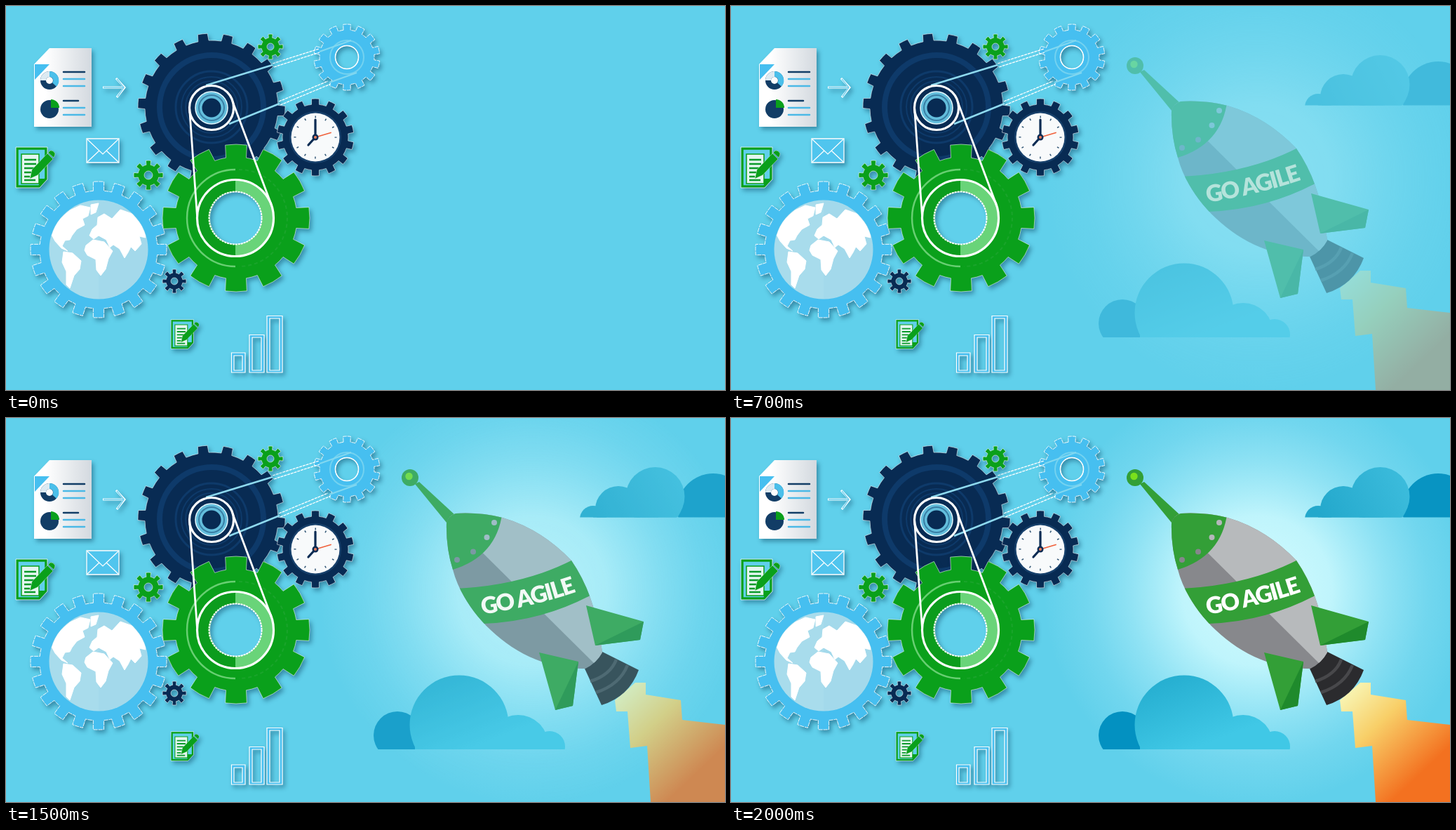
Animation, 1025 px wide and 547 px high, one loop 2.1 s. Source, as an HTML page:

```html
<!DOCTYPE html>
<html lang="en">
<head>
<meta charset="utf-8">
<title>Go agile</title>
<style>
  html, body { margin: 0; width: 100%; height: 100%; overflow: hidden; background: #60d0eb; }
  svg { display: block; width: 1025px; height: 547px; }
  .shadow { filter: drop-shadow(3px 4px 3px rgba(0, 50, 80, .42)); }
  .line { fill: none; stroke: #fff; }
  .navy { fill: #082b53; }
  .green { fill: #0aa01b; }
  .sky { fill: #46bff0; }
  .leaf { fill: #339f37; }
  .leafDark { fill: #1f8a2c; }
  .edge { stroke: #fff; stroke-opacity: .55; fill-rule: evenodd; }
  .sky.edge { stroke-opacity: .9; stroke-dasharray: 6 1; }
</style>
</head>
<body>
<svg viewBox="0 0 1025 547">
  <defs>
    <radialGradient id="glow" gradientUnits="userSpaceOnUse" cx="750" cy="246" r="305">
      <stop offset="0" stop-color="#d4fcff"/>
      <stop offset=".35" stop-color="#d0fbff" stop-opacity=".85"/>
      <stop offset=".6" stop-color="#c8f8ff" stop-opacity=".45"/>
      <stop offset=".8" stop-color="#c0f4ff" stop-opacity=".18"/>
      <stop offset="1" stop-color="#c0f4ff" stop-opacity="0"/>
    </radialGradient>
    <linearGradient id="paper">
      <stop offset=".2" stop-color="#fff"/><stop offset="1" stop-color="#d3d9df"/>
    </linearGradient>
    <linearGradient id="flame" gradientUnits="userSpaceOnUse" x1="884" y1="388" x2="990" y2="500">
      <stop offset="0" stop-color="#f8f3b0"/>
      <stop offset=".4" stop-color="#f8cf68"/>
      <stop offset="1" stop-color="#f37120"/>
    </linearGradient>
    <linearGradient id="cloudLow" gradientUnits="userSpaceOnUse" x1="620" y1="367" x2="660" y2="471">
      <stop offset="0" stop-color="#25aed0"/><stop offset="1" stop-color="#40c8e6"/>
    </linearGradient>
    <linearGradient id="cloudHigh" gradientUnits="userSpaceOnUse" x1="960" y1="80" x2="840" y2="141">
      <stop offset="0" stop-color="#3cbcdc"/><stop offset="1" stop-color="#23a8cc"/>
    </linearGradient>
    <clipPath id="aboveLow"><path d="M500 340H820V472H500Z"/></clipPath>
    <clipPath id="aboveHigh"><path d="M800 50H1025V141.500H800Z"/></clipPath>
    <clipPath id="hull"><path d="M628 149Q631 139 641 136Q676 134 708 142Q763 158 806 203Q842 255 850 334Q842 349 826 357C732 360 654 282 637 216Q627 185 628 149Z"/></clipPath>
    <clipPath id="globe"><circle cx="132" cy="347" r="70"/></clipPath>
    <path id="textLine" d="M668 281.500Q750 270 822 244.500"/>
    <g id="note">
      <path d="M16 203H57V246L47 257H16Z" fill="#60d0eb" stroke="#0aa01b" stroke-width="3.500"/>
      <path d="M14 201H59V247L48 259H14Z" class="line" stroke-opacity=".7"/>
      <path d="M22 211H47V253H22Z" fill="#e4f6f0" stroke="#0aa01b" stroke-width="1.500"/>
      <path d="M47 257V246H57Z" class="green"/>
      <path d="M26 219H43M26 225H43M26 231H40M26 237H36M26 243H34M26 248H42" fill="none" stroke="#0a9a2a" stroke-width="2.500"/>
      <path d="M34 246L37 233L59 210L67 218L45 241Z" class="green edge" stroke-width=".7"/>
      <path d="M60 209L63 206Q67 205 70 210Q70 213 68 216Z" class="green edge" stroke-width=".7"/>
    </g>
  </defs>

  <g id="scene">
    <rect x="440" width="585" height="547" fill="url(#glow)"/>
    <g clip-path="url(#aboveHigh)">
      <circle cx="1008" cy="130" r="51" fill="#0894c2"/>
      <g fill="url(#cloudHigh)">
        <circle cx="925.500" cy="112" r="42"/><circle cx="873" cy="130" r="33"/>
        <circle cx="837" cy="144" r="19"/><path d="M837 126H930V142H837Z"/>
        <path d="M900 112H967Q966 129 957 142H900Z"/>
      </g>
    </g>
    <g clip-path="url(#aboveLow)">
      <circle cx="558" cy="452" r="34" fill="#0391c1"/>
      <g fill="url(#cloudLow)">
        <circle cx="646" cy="437" r="70.500"/><path d="M583 450H730V472H583Z"/>
        <circle cx="730" cy="466" r="43"/><circle cx="775" cy="468" r="22"/>
      </g>
    </g>
    <path fill="url(#flame)" d="M868 402L897 377H912V394L962 402L964 430L1025 437V547H919L914 467L890 470L886 418H870Z"/>

    <path d="M583 94L589 91L640 138L628 149Z" class="leaf"/>
    <circle cx="576" cy="85" r="12" class="leaf"/>
    <circle cx="574.500" cy="83" r="5.200" fill="#79e01c"/>
    <path d="M850 333L902 359Q888 397 849 409L825 357Z" fill="#2b2b2e"/>
    <g fill="none" stroke="#48484b" stroke-width="4.500">
      <path d="M870 344Q862 366 833 375"/><path d="M886 352Q875 380 841 391"/>
    </g>
    <g clip-path="url(#hull)">
      <path d="M620 120H860V366H620Z" fill="#87888c"/>
      <path d="M632 145L838 349L860 360V120H632Z" fill="#b7babc"/>
      <path d="M600 130H708Q702 196 637 216H600Z" class="leaf"/>
      <path d="M640 243Q736 239 808 202L840 249Q766 290 680 293L640 270Z" class="leaf"/>
    </g>
    <g fill="#b4b7ba">
      <circle cx="696" cy="149" r="4"/><circle cx="685.500" cy="170" r="4"/>
    </g>
    <g fill="#85878b">
      <circle cx="666" cy="190.500" r="4"/><circle cx="643" cy="202" r="4"/>
    </g>
    <path d="M827 267L909 290L904 316L840 324Z" class="leaf"/>
    <path d="M909 290L904 316L840 324Z" class="leafDark"/>
    <path d="M760 334L816 347L808 410L783 416Z" class="leaf"/>
    <path d="M816 347L808 410L783 416Z" class="leafDark"/>
  </g>
  <text id="slogan" fill="#fff" font-family="Lato, sans-serif" font-weight="900" font-size="33" letter-spacing="-1.700" text-anchor="middle"><textPath href="#textLine" startOffset="50%">GO AGILE</textPath></text>

  <g class="shadow">
    <path d="M62 60H122V172H40V83Z" fill="url(#paper)"/>
    <path d="M41 83H62L41 105Z" class="sky"/>
    <g fill="none" stroke-width="8">
      <circle cx="62" cy="106" r="9" stroke="#123d66"/>
      <path d="M62 97A9 9 0 0 1 69 112" stroke="#4bbfea"/>
      <path d="M53 106A9 9 0 0 1 62 97" stroke="#dceaf2"/>
    </g>
    <circle cx="62" cy="147" r="13" fill="#123d66"/>
    <path d="M64 145V133A12 12 0 0 1 76 145Z" class="green"/>
    <g stroke-width="2.500" stroke-linecap="round">
      <path d="M82 94H112M82 135H103" stroke="#123d66"/>
      <path d="M82 104H112M82 114H112M82 145H112M82 155H112" stroke="#4bb9e6"/>
    </g>
  </g>
  <g class="shadow">
    <path d="M138 116H168M157 103L169 116L158 130" class="line" stroke-width="3"/>
    <path d="M139 116H168M158 104L168 116L159 129" fill="none" stroke="#70cfee" stroke-width="1.400"/>
    <path d="M115 189H161V223H115Z" fill="#50c5ee" stroke="#fff" stroke-width="1.300"/>
    <path d="M116 190L138 211L160 190M116 222L133 206M160 222L143 206" class="line" stroke-width="1.200"/>
    <use href="#note"/>
    <use href="#note" transform="translate(225 302) scale(.72)"/>
    <path class="sky" fill-rule="evenodd" stroke="#fff" stroke-width="1.200" d="M321.500 494H341V522H321.500ZM325 498H337V519H325ZM347 468.500H368V522H347ZM351 472H364V519H351ZM372 441.500H394V522H372ZM376 445H390V519H376Z"/>
  </g>

  <g class="shadow">
    <path data-gear="132 347 97 84 20 .25" class="sky edge"/>
    <path data-gear="486 73 47 39 14 .25 16.500" class="sky edge"/>
  </g>
  <circle cx="132" cy="347" r="70.500" fill="#a8dcec"/>
  <g clip-path="url(#globe)">
    <path d="M132 277A70 70 0 0 1 132 417Z" fill="#9bd4e8" opacity=".45"/>
    <path fill="#fff" stroke="#fff" stroke-linejoin="round" d="
      M64 324L76 304L91 291L106 284L120 287L117 299L109 303L112 312L101 318L94 327L91 333L84 334L80 342L88 349L79 345L70 335Z
      M121 283L132 281L128 294L121 297Z
      M82 350L95 352L107 363L105 375L97 384L91 402L86 397L86 378L80 365Z
      M114 341L124 333L140 336L152 349L146 360L142 375L135 384L129 376L128 361L116 355L112 348Z
      M119 327L123 318L130 312L131 301L140 296L151 303L163 290L180 296L197 317L199 330L190 328L193 339L184 349L178 343L174 351L169 359L162 346L153 340L148 344L143 333L132 327L125 332Z"/>
  </g>
  <g class="line">
    <circle cx="486" cy="73" r="24" stroke="#73d2f0" stroke-width="2"/>
    <path d="M447 65L492 49M461 109L500 95" stroke="#82d8f0" stroke-width="2"/>
    <circle cx="486" cy="73" r="16.500" stroke-width="1.500"/>
  </g>

  <path data-gear="293 144 105 95 18 .19 0 -97" class="navy edge shadow"/>
  <g fill="none" stroke="#0e3a6a">
    <circle cx="293" cy="144" r="74" stroke-width="8"/>
    <circle cx="293" cy="144" r="51" stroke-width="3"/>
    <circle cx="293" cy="144" r="43" stroke-width="2"/>
    <circle cx="293" cy="144" r="37" stroke-width="2"/>
  </g>
  <g class="line">
    <path d="M285 113L380 84M318 168L390 139" stroke="#8ed9ee" stroke-width="2.500"/>
    <path d="M380 82L446 61M382 87L447 66M389 136L459 107M391 141L463 111" stroke-width="1.300" stroke-dasharray="4 1"/>
  </g>

  <path data-gear="328 302 105 87 12 .28 37.500" class="green edge shadow"/>
  <g fill="none">
    <circle cx="327" cy="302" r="46" stroke="#0c9c1d" stroke-width="16"/>
    <path d="M327 256A46 46 0 0 1 327 348" stroke="#69d479" stroke-width="16"/>
    <path d="M327 233A69 69 0 0 0 327 371" stroke="#68cf72" stroke-width="2.500"/>
    <path d="M332 233A69 69 0 0 1 332 371" stroke="#1aa42b" stroke-width="2" stroke-dasharray="5 4"/>
    <circle cx="327" cy="302" r="37.500" stroke="#fff" stroke-width="2" stroke-dasharray="3 1"/>
  </g>
  <circle cx="293" cy="145" r="31.500" class="navy"/>
  <circle cx="293" cy="145" r="23" fill="#63bedc" stroke="#e5f8fd" stroke-width="1.500"/>
  <circle cx="293" cy="145" r="18" fill="none" stroke="#397fa5" stroke-width="2"/>
  <circle cx="293" cy="145" r="13.500" class="navy"/>
  <g class="line" stroke-width="3.200">
    <circle cx="293" cy="145" r="31.500"/>
    <circle cx="327" cy="302" r="54.500"/>
    <path d="M261.500 145L272.500 299M323 136L379 285" stroke-width="2.800"/>
  </g>

  <path data-gear="441 187 55 47 14 .22" class="navy edge shadow"/>
  <circle cx="441" cy="187" r="37" fill="#17406b"/>
  <circle cx="441" cy="187" r="34.500" fill="#f8fafb"/>
  <g fill="none" stroke-linecap="round">
    <circle cx="441" cy="187" r="29" stroke="#315675" stroke-width="3" stroke-linecap="butt" stroke-dasharray="1.500 13.684" stroke-dashoffset=".75"/>
    <path d="M441 187V162M441 187L431 198" stroke="#082b53" stroke-width="3.200"/>
    <path d="M441 187L463 180.500" stroke="#f0623c" stroke-width="1.800"/>
  </g>
  <circle cx="441" cy="187" r="4.500" class="navy"/>
  <circle cx="441" cy="187" r="2" fill="#f0805f"/>

  <g class="shadow">
    <path data-gear="377 58 18 13 8 .22 5" class="green edge"/>
    <path data-gear="203 241 21 15 8 .22 6" class="green edge"/>
    <path data-gear="240 392 17 12 8 .22 5" class="navy edge"/>
  </g>
</svg>
<script>
  // Gear data: centre, outer radius, root radius, teeth, half tooth width in pitches, hole radius, first angle.
  function gearPath(cx, cy, outer, root, teeth, half, hole = 0, start = -90) {
    const point = (radius, turn) => {
      const angle = start * Math.PI / 180 + turn * 2 * Math.PI / teeth;
      return `${(cx + radius * Math.cos(angle)).toFixed(2)} ${(cy + radius * Math.sin(angle)).toFixed(2)}`;
    };
    const arc = (radius, turn) => `A${radius} ${radius} 0 0 1 ${point(radius, turn)}`;
    let d = 'M' + point(root, -half - .04);
    for (let i = 0; i < teeth; i++) {
      d += `L${point(outer, i - half)}${arc(outer, i + half)}L${point(root, i + half + .04)}${arc(root, i + 1 - half - .04)}`;
    }
    d += 'Z';
    if (hole) d += `M${point(hole, 0)}${arc(hole, teeth / 2)}${arc(hole, 0)}Z`;
    return d;
  }
  for (const path of document.querySelectorAll('[data-gear]')) {
    path.setAttribute('d', gearPath(...path.dataset.gear.split(' ').map(Number)));
  }

  const STEP = 100, STEPS = 21;
  const scene = document.getElementById('scene');
  const slogan = document.getElementById('slogan');
  function draw() {
    const fade = Math.floor(performance.now() / STEP) % STEPS / (STEPS - 1);
    scene.setAttribute('opacity', fade);
    slogan.setAttribute('opacity', 1 - (1 - fade) ** 2);
    requestAnimationFrame(draw);
  }
  draw();
</script>
</body>
</html>
```
